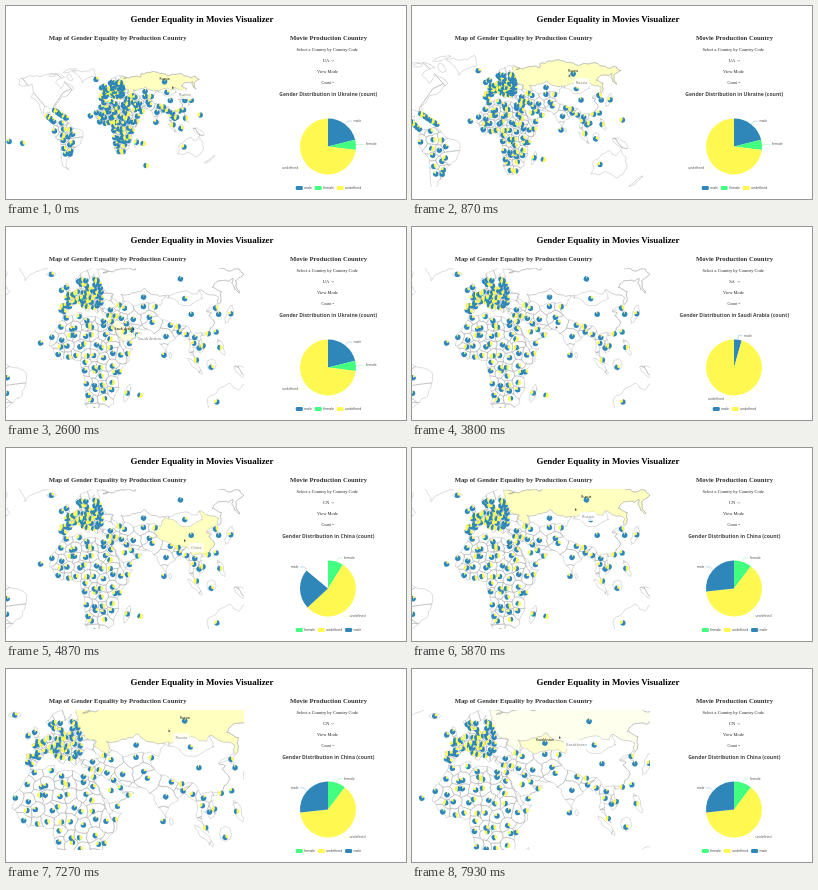
These frames come from a looping animation (400 by 193 pixels, 8000 ms). An HTML page with a canvas:

```html
<!DOCTYPE html>
<html lang="en">
<head>
<meta charset="utf-8">
<title>Gender Equality in Movies Visualizer</title>
<style>
  html, body { margin: 0; width: 100%; height: 100%; overflow: hidden; background: #fff; }
  canvas, svg { position: absolute; left: 0; top: 0; width: 400px; height: 193px; }
  text { font-family: "Liberation Serif", serif; text-anchor: middle; fill: #222; }
  .h1 { font-size: 8.94px; font-weight: bold; fill: #000; }
  .h2 { font-size: 6.7px; font-weight: bold; fill: #333; }
  .body { font-size: 4.47px; }
  .small { font-size: 3.8px; }
  .chart { font: bold 5.1px "Noto Sans", sans-serif; fill: #464646; }
  path { fill: none; stroke: #333; stroke-width: .45; }
</style>
</head>
<body>
<canvas id="stage"></canvas>
<svg viewBox="0 0 400 193">
  <text class="h1" x="196" y="15.5">Gender Equality in Movies Visualizer</text>
  <text class="h2" x="111.7" y="33.8">Map of Gender Equality by Production Country</text>
  <text class="h2" x="322.5" y="33.8">Movie Production Country</text>
  <text class="body" x="321.3" y="45.4">Select a Country by Country Code</text>
  <text class="body" id="code" x="320" y="56.4"></text>
  <path d="M325.6 54.2l1.1 1.1 1.1-1.1M326.2 75.9l1 1 1-1"/>
  <text class="body" x="321.5" y="67.4">View Mode</text>
  <text class="small" x="320.2" y="77.8">Count</text>
  <text class="chart" id="heading" x="322.3" y="90"></text>
</svg>
<script>
const LOOP = 8000;
const BLUE = '#2e86b9', GREEN = '#42ff80', YELLOW = '#fff850';
const canvas = document.getElementById('stage'), ctx = canvas.getContext('2d');
const ratio = Math.max(1, window.devicePixelRatio || 1);
canvas.width = 400 * ratio;
canvas.height = 193 * ratio;

// Coasts as longitude, latitude pairs
const europeCoast = [-9,37, -9,43, -2,43.5, -5,48.5, 2,51, 8,54, 10,57.5, 11,54, 20,54.5, 23,58, 29,60, 22,60,
  25,65.5, 17,61, 16,56, 13,55.5, 8,58, 5,61, 14,67, 25,71];
const russiaCoast = [40,67.5, 34,66, 45,67, 69,68.5, 72,73, 104,77.5, 113,74, 140,73, 160,70, 180,69, 180,65,
  163,60, 157,51, 157,58, 163,62, 155,59.5, 143,59, 135,55, 141,52, 132,43];
const asiaCoast = [127,40, 128,35, 125,39.5, 118,38, 122,37, 119,35, 122,30, 114,22.5, 108,21.5, 109,12, 105,9,
  100,13.5, 104,1.5, 98,8, 98,16, 91,22.5, 80,15, 77.5,8, 72,21, 67,25, 57,26, 48,30, 51,25, 59.5,22.5, 45,13, 39,21];
const southCoast = [35,28, 34,31, 36,36, 28,36.5, 27,40, 41,41, 37,45, 32,46.5, 28,42, 23,37, 19,42, 13,45.5,
  18,40, 16,38, 9,44, 3,43, -2,37];
const eurasia = europeCoast.concat(russiaCoast, asiaCoast, southCoast);
const africa = [-6,35.5, 10,37, 11,33, 32,31, 43,11.5, 51,12, 40,-3, 40,-15, 27,-34, 18,-34.5, 12,-16, 9,4, -7,4.5,
  -17,14.5, -16,22];
const southAmerica = [-77,8, -62,10.5, -50,0, -35,-6, -40,-21, -48,-26, -58,-38, -65,-41, -69,-52, -66,-55, -75,-50,
  -70,-20, -81,-5];
const northAmerica = [-168,66, -156,71, -128,70, -82,68, -94,60, -80,52, -78,62, -56,52, -74,40, -81,31, -80,25, -97,28,
  -97,20, -87,21, -83,10, -77,8, -95,16, -124,40, -124,48, -135,58, -158,57];
const greenland = [-73,78, -30,83.5, -22,71, -44,60, -54,70];
const australia = [114,-22, 130,-12, 138,-17, 142,-11, 153,-26, 148,-38, 132,-32, 115,-34];
// longitude, latitude, half width, half height, tilt
const islands = [[-2,54,2,4.5,20], [-8,53,2,2,0], [-19,65,5,1.6,0], [137,36,9,2,45], [101,0,8,1.5,-45], [114,1,4,4,0],
  [141,-5,10,3,-25], [172,-41,7,1.5,50], [47,-19,2,6.5,-15], [123,13,2,6,20], [81,7.5,1,2,0], [-72,68,9,3,-30],
  [-80,79,12,3,15], [-109,71,7,2,0], [-79,21.5,5,.7,-15]];

const regions = {
  Russia: { at: [110, 61.5] }, China: { at: [104.2, 35.9] },
  Kazakhstan: { at: [66.9, 48] }, 'Saudi Arabia': { at: [45.1, 23.9] }
};
regions.Russia.shape = russiaCoast.concat([135,48, 127,50, 121,53, 117,50, 98,51, 87,49, 71,54, 61,51, 47,50, 47,42,
  38,47, 40,50, 32,53, 28,57, 30,64, 29,69]);
regions.China.shape = [73.5,39, 80,45, 87,49, 97,43, 105,42, 120,47, 121,53, 127,50, 135,48, 131,43, 121,40, 118,38,
  122,37, 119,35, 122,30, 114,22.5, 101,21.5, 97,28, 88,28, 79,32];
regions.Kazakhstan.shape = [47,50, 61,51, 71,54, 87,49, 80,42, 56,41.5, 48,46];
regions['Saudi Arabia'].shape = [35,28, 39,32, 51,25, 55,21, 43,17, 39,21];

const asianSites = [35.2,39, 33.4,35.1, 38.9,34.8, 34.9,31, 43.7,33.2, 53.7,32.4, 45.1,23.9, 48.5,15.6, 55.9,21.5,
  51.2,25.4, 47.5,29.3, 43.4,42.3, 47.6,40.1, 66.9,48, 64.6,41.4, 74.8,41.2, 67.7,33.9, 69.3,30.4, 79,20.6, 84.1,28.4,
  90.4,23.7, 90.4,27.5, 76,7.5, 104.2,35.9, 103.8,46.9, 110,61.5, 127.8,35.9, 127.5,40.3, 138.3,36.2, 121,23.7,
  114.1,22.4, 96,21.9, 101,15.9, 102.5,19.9, 105,12.6, 108.3,14.1, 102,4.2, 113.9,-.8, 121.8,12.9];
const oceanSites = [145,17, 122,-25, 69.3,-49.3, -149.4,-17.7, -129,-20, 46.9,-18.8, 57.6,-20.3, -24,16, -19,65, -8,53, -3.4,55];

let seed = 11;
const random = () => (seed = seed * 16807 % 2147483647) / 2147483647;
for (let i = 0; i < 9; i++) random();

const pairs = flat => flat.flatMap((v, i) => i % 2 ? [] : [[v, flat[i + 1]]]);

function inside([x, y], poly) {
  return poly.reduce((hit, [ax, ay], i) => {
    const [bx, by] = poly[(i + 1) % poly.length];
    return (ay > y) !== (by > y) && x < ax + (bx - ax) * (y - ay) / (by - ay) ? !hit : hit;
  }, false);
}
// Loose lattice of places that fall on one landmass
function scatter(flat, [west, east], [south, north], dx, dy) {
  const poly = pairs(flat), out = [];
  for (let y = south; y <= north; y += dy)
    for (let x = west; x <= east; x += dx) {
      const p = [x + (random() - .5) * dx * .7, y + (random() - .5) * dy * .7];
      if (inside(p, poly)) out.push(p);
    }
  return out;
}
function chain([ax, ay], [bx, by], n) {
  return Array.from({ length: n }, (_, i) => [ax + (bx - ax) * i / (n - 1), ay + (by - ay) * i / (n - 1)]);
}

// Natural Earth projection on a unit globe
function project([lon, lat]) {
  const l = lon * Math.PI / 180, p = lat * Math.PI / 180, p2 = p * p, p4 = p2 * p2;
  return [
    l * (.8707 - .131979 * p2 + p4 * (-.013791 + p4 * (.003971 * p2 - .001529 * p4))),
    -p * (1.007226 + p2 * (.015085 + p4 * (-.044475 + .028874 * p2 - .005916 * p4)))
  ];
}
// Bends each edge the same way from either side, so neighbours still meet
function roughen(poly, depth = 3) {
  if (!depth) return poly;
  return roughen(poly.flatMap((a, i) => {
    const b = poly[(i + 1) % poly.length], mx = (a[0] + b[0]) / 2, my = (a[1] + b[1]) / 2;
    const bend = Math.sin(410 * mx + 930 * my) * (a[0] > b[0] ? -.13 : .13);
    return [a, [mx - (b[1] - a[1]) * bend, my + (b[0] - a[0]) * bend]];
  }), depth - 1);
}
const outline = flat => roughen(pairs(flat).map(project));
function island([lon, lat, w, h, tilt]) {
  const c = Math.cos(tilt * Math.PI / 180), s = Math.sin(tilt * Math.PI / 180);
  return roughen(Array.from({ length: 8 }, (_, i) => {
    const x = w * Math.cos(i * Math.PI / 4), y = h * Math.sin(i * Math.PI / 4);
    return project([lon + x * c - y * s, lat + x * s + y * c]);
  }), 2);
}
function polygonPath(polys) {
  const path = new Path2D();
  for (const poly of polys) {
    poly.forEach(([x, y], i) => i ? path.lineTo(x, y) : path.moveTo(x, y));
    path.closePath();
  }
  return path;
}

const sites = [
  ...scatter(africa, [-15, 50], [-31, 34], 7, 6.4),
  ...scatter(southAmerica, [-76, -46], [-37, 8], 9, 9),
  ...chain([-90, 15.5], [-80, 8.5], 5), ...chain([-80, 23], [-61, 13], 8),
  ...pairs(oceanSites), ...pairs(asianSites),
  ...scatter(eurasia, [-8, 30], [38.5, 62], 4, 3.1)
].map(project);
const markers = sites.map(pos => {
  const blue = .4 + .55 * random(), green = random() < .3 ? .1 * random() : 0;
  const parts = [[BLUE, blue], [GREEN, green], [YELLOW, 1 - blue - green]];
  return { pos, parts: random() < .6 ? parts.reverse() : parts };
});

// Borders are the cells nearest to each marker
function cellOf(site) {
  let poly = [[-4, -2], [4, -2], [4, 2], [-4, 2]];
  for (const o of sites) {
    if (o === site) continue;
    const nx = o[0] - site[0], ny = o[1] - site[1];
    const limit = (o[0] ** 2 + o[1] ** 2 - site[0] ** 2 - site[1] ** 2) / 2;
    const side = q => q[0] * nx + q[1] * ny - limit;
    poly = poly.flatMap((a, i) => {
      const b = poly[(i + 1) % poly.length], sa = side(a), sb = side(b), f = sa / (sa - sb);
      const kept = sa <= 0 ? [a] : [];
      if (sa * sb < 0) kept.push([a[0] + (b[0] - a[0]) * f, a[1] + (b[1] - a[1]) * f]);
      return kept;
    });
  }
  return poly;
}
const coasts = [eurasia, africa, southAmerica, northAmerica, greenland, australia];
const landPath = polygonPath([...coasts.map(outline), ...islands.map(island)]);
const borderPath = polygonPath(sites.map(s => roughen(cellOf(s), 2)));
for (const r of Object.values(regions)) {
  r.path = polygonPath([outline(r.shape)]);
  r.pos = project(r.at);
}

// time, globe radius, centre x, centre y
const views = [[300, 43.3, 100, 122], [1550, 81.6, 54, 145], [1780, 81.6, 54, 145], [2500, 81.6, 64, 139],
  [6100, 81.6, 64, 139], [6780, 107.7, 33, 167], [7200, 107.7, 33, 167], [7960, 97.6, 45, 156.6]];
const cursorPath = [[0, 166, 80], [1500, 151, 61], [1850, 151, 61], [2500, 125, 103], [3500, 125, 103],
  [4250, 178, 91], [5250, 178, 91], [5850, 163, 60], [7200, 163, 60], [7850, 147, 67]];
const hovers = [['Russia', 0, 1900], ['Saudi Arabia', 2480, 3500], ['China', 4120, 5400],
  ['Russia', 5520, 7750], ['Kazakhstan', 7750, 8300]];
const charts = [
  { from: -2000, code: 'UA', name: 'Ukraine', slices: [['male', BLUE, 76], ['female', GREEN, 21], ['undefined', YELLOW, 263]] },
  { from: 2800, code: 'SA', name: 'Saudi Arabia', slices: [['male', BLUE, 16], ['undefined', YELLOW, 344]] },
  { from: 4390, code: 'CN', name: 'China', slices: [['female', GREEN, 37], ['undefined', YELLOW, 227], ['male', BLUE, 96]] }
];

const clamp = v => Math.min(1, Math.max(0, v));
const smooth = v => v * v * (3 - 2 * v);
function sample(keys, t) {
  const i = keys.findIndex(k => k[0] > t);
  if (i === 0) return keys[0].slice(1);
  if (i < 0) return keys[keys.length - 1].slice(1);
  const a = keys[i - 1], b = keys[i], f = smooth((t - a[0]) / (b[0] - a[0]));
  return a.slice(1).map((v, j) => v + (b[j + 1] - v) * f);
}

function wedge(x, y, r, from, to, color) {
  ctx.fillStyle = color;
  ctx.beginPath();
  ctx.moveTo(x, y);
  ctx.arc(x, y, r, from - Math.PI / 2, to - Math.PI / 2);
  ctx.fill();
}
function label(text, x, y, size, color, align) {
  ctx.font = size + 'px "Noto Sans", sans-serif';
  ctx.fillStyle = color;
  ctx.textAlign = align;
  ctx.textBaseline = 'middle';
  ctx.fillText(text, x, y);
}

function drawMap(t) {
  const [k, x0, y0] = sample(views, t);
  const [cx, cy] = sample(cursorPath, t);
  const toStage = p => [x0 + p[0] * k, y0 + p[1] * k];
  const shown = hovers.map(([name, from, to]) => ({
    name, over: t >= from && t < to,
    alpha: (from ? clamp((t - from) / 250) : 1) * clamp((to + 250 - t) / 250)
  })).filter(h => h.alpha > 0);

  ctx.save();
  ctx.beginPath();
  ctx.rect(0, 41, 238, 140);
  ctx.clip();

  ctx.save();
  ctx.translate(x0, y0);
  ctx.scale(k, k);
  ctx.strokeStyle = '#999';
  ctx.lineWidth = .35 / k;
  ctx.save();
  ctx.clip(landPath);
  ctx.stroke(borderPath);
  ctx.restore();
  for (const [name, r] of Object.entries(regions)) {
    ctx.fillStyle = '#fff';
    ctx.fill(r.path);
    const h = shown.find(s => s.name === name);
    if (h) {
      ctx.globalAlpha = h.alpha;
      ctx.fillStyle = '#ffffbf';
      ctx.fill(r.path);
      ctx.globalAlpha = 1;
    }
    ctx.stroke(r.path);
  }
  ctx.stroke(landPath);
  ctx.restore();

  for (const m of markers) {
    const [x, y] = toStage(m.pos);
    let turn = 0;
    for (const [color, share] of m.parts) {
      const end = turn + share * Math.PI * 2;
      if (share > 0) wedge(x, y, 2.75, turn, end, color);
      turn = end;
    }
  }

  const hover = shown.find(h => h.over);
  if (hover) {
    const [x, y] = toStage(regions[hover.name].pos);
    if (hover.name !== 'China') label(hover.name, x, y - 3, 3.35, '#111', 'center');
    ctx.font = '3.9px "Noto Sans", sans-serif';
    ctx.fillStyle = 'rgba(255,255,255,.85)';
    ctx.fillRect(cx + 5, cy + 4, ctx.measureText(hover.name).width + 4, 9);
    label(hover.name, cx + 7, cy + 8.6, 3.9, '#888', 'left');
  }
  ctx.fillStyle = '#555';
  ctx.beginPath();
  ctx.moveTo(cx, cy);
  ctx.lineTo(cx + 2, cy + 2);
  ctx.lineTo(cx, cy + 3);
  ctx.fill();
  ctx.restore();
}

function drawChart(t) {
  const chart = charts.filter(c => t >= c.from).pop();
  const open = 1 - (1 - clamp((t - chart.from) / 1000)) ** 3;
  const x = 322, y = 140.5, r = 28, rad = Math.PI / 180;
  document.getElementById('code').textContent = chart.code;
  document.getElementById('heading').textContent = `Gender Distribution in ${chart.name} (count)`;

  let turn = 0;
  for (const [name, color, size] of chart.slices) {
    wedge(x, y, r, turn * open * rad, (turn + size) * open * rad, color);
    const mid = (turn + size / 2) * rad, dx = Math.sin(mid), dy = -Math.cos(mid), dir = Math.sign(dx);
    const ex = x + dx * (r + 4.2), ey = y + dy * (r + 4.2);
    ctx.strokeStyle = color;
    ctx.lineWidth = .3;
    ctx.beginPath();
    ctx.moveTo(x + dx * r, y + dy * r);
    ctx.lineTo(ex, ey);
    ctx.lineTo(ex + dir * 4.2, ey);
    ctx.stroke();
    label(name, ex + dir * 5.6, ey, 3.35, '#555', dir > 0 ? 'left' : 'right');
    turn += size;
  }

  ctx.font = '3.35px "Noto Sans", sans-serif';
  const widths = chart.slices.map(s => 8.4 + ctx.measureText(s[0]).width);
  let left = 322.5 - (widths.reduce((a, b) => a + b) + 2.8 * (widths.length - 1)) / 2;
  chart.slices.forEach(([name, color], i) => {
    ctx.fillStyle = color;
    ctx.beginPath();
    ctx.roundRect(left, 180.1, 7, 3.9, 1.2);
    ctx.fill();
    label(name, left + 8.4, 182.1, 3.35, '#444', 'left');
    left += widths[i] + 2.8;
  });
}

const start = performance.now();
function tick() {
  const t = (performance.now() - start) % LOOP;
  ctx.setTransform(ratio, 0, 0, ratio, 0, 0);
  ctx.clearRect(0, 0, 400, 193);
  drawMap(t);
  drawChart(t);
  requestAnimationFrame(tick);
}
tick();
</script>
</body>
</html>
```
